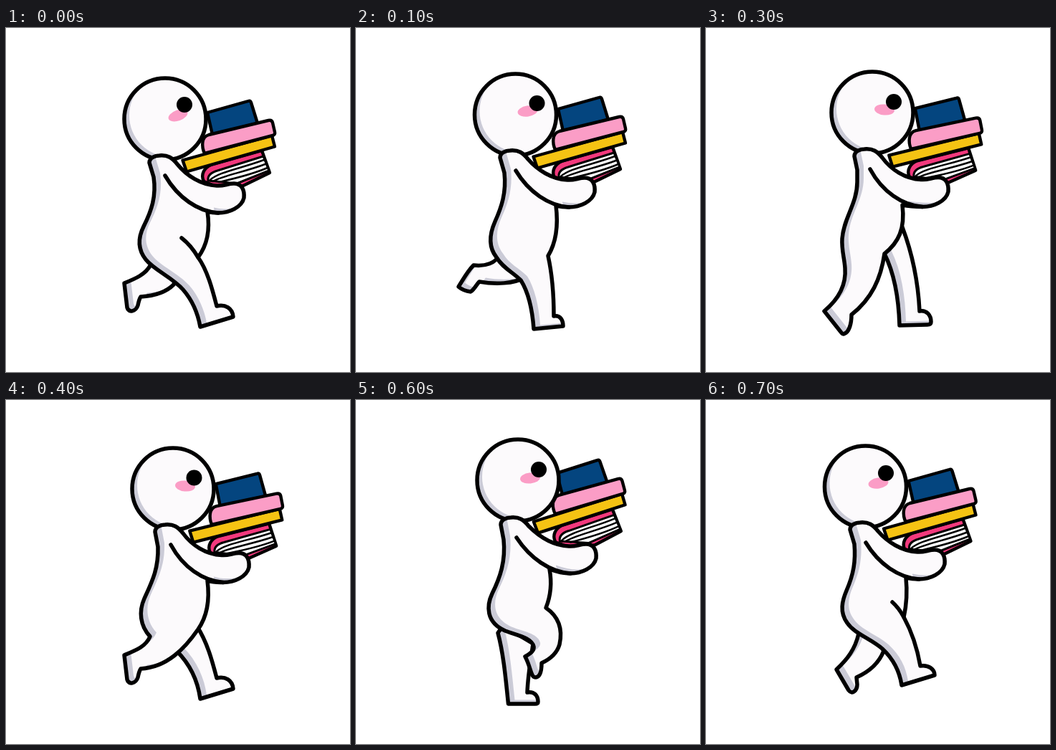
An HTML page for the animation above (0.8 s loop, 480 by 480 pixels).

```html
<!DOCTYPE html>
<html lang="en">
<head>
<meta charset="utf-8">
<title>Walking with books</title>
<style>
  html, body { margin: 0; width: 100%; height: 100%; overflow: hidden; background: #fff; }
  svg { display: block; width: 100%; height: 100%; }
  .ink { fill: none; stroke: #000; stroke-width: 5.5; stroke-linejoin: round; stroke-linecap: round; }
  .shade { fill: #cbcbd7; }
  .light { fill: #fcfafc; }
  #books { stroke: #000; stroke-width: 4.4; stroke-linejoin: round; stroke-linecap: round; }
</style>
</head>
<body>
<svg id="stage" viewBox="0 0 480 480">
  <g id="far"></g>
  <g id="books">
    <path fill="#f2397d" d="M276,214 C271,204 277,195 286,191 L357,171 L368,202 L331,220 L300,224 Z"/>
    <path fill="#fff" stroke-width="3" d="M282,213 C281,205 288,201 295,199 L359,179 L367,199 L322,217 Z"/>
    <path fill="none" stroke-width="2.5" d="M285,212 C296,201 328,196 360,184 M289,214 C302,206 333,201 363,189.500 M297,215 C314,211 339,206 365,195"/>
    <path fill="#04457f" d="M281,118 L338,102 Q341,101 342,104 L351,133 L288,149 Z"/>
    <path fill="#f5c313" d="M246.500,184.500 L371,150 L375,165.500 L252,200.500 Z"/>
    <path fill="#fb9dc6" d="M277,175 C273,166 272,152 283,149 L366,129 Q371,128 372,132 L375,145 Q376,149 372,150 Z"/>
  </g>
  <g id="head">
    <clipPath id="skull"><circle r="57"/></clipPath>
    <circle class="shade" r="57"/>
    <circle class="light" r="58" cx="8" cy="-5" clip-path="url(#skull)"/>
    <circle class="ink" r="57"/>
    <ellipse id="cheek" rx="14" ry="7.5" fill="#fb9dc6"/>
    <circle id="eye" r="11"/>
  </g>
  <g id="body"></g>
  <path id="seam" class="ink"/>
</svg>
<script>
const STEP = 100;
const $ = id => document.getElementById(id);

const NECK = 'M200,188 C200,181 208,178 214,178 C226,177 232,181 239,190';
const ARM = ' C252,206 272,219 294,220 C303,221 310,217 318,217' +
            ' C329,217 333,226 332,237 C329,250 312,258 296,258';

// Lower leg and foot pieces shared by the two passing poses
const STAND = ' C246,350 240,380 239,408 C249,406 254,413 254,421 Q254,424 250,424 L212.5,424 C209,390 206,355 198,325';
const LIFT = ' C281,301 289,318 284,341 C280,355 270,362 259,367 C259,379 257,387 250,387' +
             ' C244,387 244,373 236,358 C243,354 249,350 248,344 C245,331 223,328 208,322';

const WAIST = ' C181,310 182,287 190,270 C201,248 209,225 206,195';

// near: belly, near leg and back; far: the leg behind; books: shift and turn
const poses = [
  { head: [222, 127], eye: [27, -20], cheek: [18, -5, -20], neck: [0, 0], hand: [0, 0], books: [0, 0, 0],
    near: 'Q288,258 281,256 C284,275 283,300 268,320 C281,338 288,365 294,388 C306,385 316,391 317,403 L271,417' +
          ' C268,400 260,380 247,365 C232,348 207,338 195,323 C184,309 184,293 192,277 C203,255 210,235 206,208',
    seam: 'M268,320 Q258,303 245,293',
    far: 'M202,330 C195,344 180,350 165,356 L169,390 C171,398 181,396 184,387 C185,382 186,378 188,375 C205,374 222,370 234,358 L240,335 Z' },
  { head: [222.5, 121], eye: [30, -16], cheek: [17, -5, -8], neck: [1, -7], hand: [1, -8], books: [1, -5, 0],
    near: 'Q288,250 279,248 C282,272 280,298 268,318 C274,345 276,375 276,402 C285,400 289,408 289,416 L248,420' +
          ' C246,392 240,368 230,352 C218,340 205,335 196,320 C185,306 186,288 194,270 C203,250 210,230 207,202',
    seam: '',
    far: 'M200,316 C196,328 180,333 164,331 C155,340 149,352 143,361 Q150,367 160,368 C165,365 168,358 172,354 C195,358 220,357 236,348 Z' },
  { head: [226, 112], eye: [32, -12], cheek: [15, -5, 7], neck: [2, -14], hand: [3, -16], books: [1, -17, -2],
    near: 'Q286,242 270,236 C274,258 271,278 262,300 C256,314 250,328 247,340' + STAND +
          ' C193,311 183,303 184,285 C186,262 207,240 207,205 L206,190',
    seam: '',
    far: 'M245,295 L265,293' + LIFT + ' Z' },
  { head: [232, 118], eye: [30, -15], cheek: [17, -4, 5], neck: [7, -9], hand: [6, -8.5], books: [9, -5, 1.7],
    near: 'Q286,249 274,247 C278,280 269,299 249,315 C244,350 231,378 203,400 C203,412 200,425 192,427 Q190,427 188,424 L165,395' +
          ' C183,380 196,360 194,335 C193,320 189,310 190,294 C192,265 211,245 211,215 L211,198',
    seam: '',
    far: 'M274,278 C288,315 296,355 298,395 C308,393 314,401 314,410 Q314,414 309,414 L270,415 C269,380 264,345 249,315 Z' },
  { head: [233, 124], eye: [29.5, -15.5], cheek: [17, -4, 5], neck: [8, -4], hand: [7, -3.5], books: [10, 0, 1.7],
    near: 'Q290,255 281,252 C284,275 282,300 268,320 C250,346 225,373 188,375 C186,378 185,382 184,387 C181,396 171,398 169,390 L165,356' +
          ' C182,349 195,344 201,330 C187,315 185,295 193,277 C204,253 213,235 212,205',
    seam: '',
    far: 'M266,315 C281,338 288,365 294,388 C306,385 316,391 317,403 L271,417 C268,395 258,370 238,350 Z' },
  { head: [232, 118], eye: [29, -16], cheek: [16, -4, 3], neck: [7, -9], hand: [6, -8.5], books: [9, -5, 1.7],
    near: 'Q288,250 278,248 C281,278 276,303 264,321 C237,355 212,358 172,354 C167,358 165,366 159,368 Q149,367 143,361' +
          ' C150,352 155,339 164,331 C180,334 195,327 197,316 C187,307 185,291 191,274 C199,250 212,235 211,198',
    seam: '',
    far: 'M266,318 C273,345 277,375 277,402 C286,400 290,408 290,417 L249,420 C247,392 242,370 230,352 Z' },
  { head: [226, 112], eye: [29, -15], cheek: [17, -3, -6], neck: [2, -14], hand: [3, -16], books: [1, -17, -2],
    near: 'Q286,242 270,236 C274,258 271,275 265,290' + LIFT + WAIST,
    seam: '',
    far: 'M205,315 L247,340' + STAND + ' Z' },
  { head: [222.5, 121], eye: [28.5, -19], cheek: [18, -5, -8], neck: [1, -7], hand: [1, -8], books: [1.5, -5, 0],
    near: 'Q288,250 279,248 C281,268 280,285 276,303 C288,325 295,348 299,371 C311,369 319,376 319,384 L273,398' +
          ' C270,378 262,362 246,347 C230,333 207,326 197,311 C186,296 190,280 196,266 C206,243 209,225 207,201',
    seam: 'M276,303 Q269,290 260,282',
    far: 'M213,326 C208,348 197,362 182,376 L199,405 C204,412 211,405 211,397 L210,387 C228,379 241,368 248,350 L235,330 Z' }
];

// Moves every coordinate pair of a path
const shift = (d, [dx, dy]) =>
  d.replace(/([\d.]+),([\d.]+)/g, (_, x, y) => `${+x + dx},${+y + dy}`);

// Fills a group with a shaded, outlined shape; returns its path setter
function shadedShape(id) {
  const clip = id + 'Clip';
  $(id).innerHTML = `<clipPath id="${clip}"><path/></clipPath><path class="shade"/>` +
    `<g clip-path="url(#${clip})"><path class="light" transform="translate(9 -5.5)"/></g><path class="ink"/>`;
  const paths = $(id).querySelectorAll('path');
  return d => paths.forEach(p => p.setAttribute('d', d));
}

const setFar = shadedShape('far');
const setBody = shadedShape('body');
const place = (id, x, y, turn = '') =>
  $(id).setAttribute('transform', `translate(${x} ${y}) ${turn}`);

function draw(p) {
  setFar(p.far);
  setBody(shift(NECK, p.neck) + shift(ARM, p.hand) + ' ' + p.near + ' Z');
  $('seam').setAttribute('d', shift('M296,258 C268,256 240,237 ', p.hand) + shift('222,206 ', p.neck) + p.seam);
  place('books', p.books[0], p.books[1], `rotate(${p.books[2]} 311 176)`);
  place('head', ...p.head);
  place('eye', ...p.eye);
  place('cheek', p.cheek[0], p.cheek[1], `rotate(${p.cheek[2]})`);
}

let shown = -1;
const start = performance.now();
function tick() {
  const i = Math.floor((performance.now() - start) / STEP) % poses.length;
  if (i !== shown) draw(poses[shown = i]);
  requestAnimationFrame(tick);
}
tick();
</script>
</body>
</html>
```
